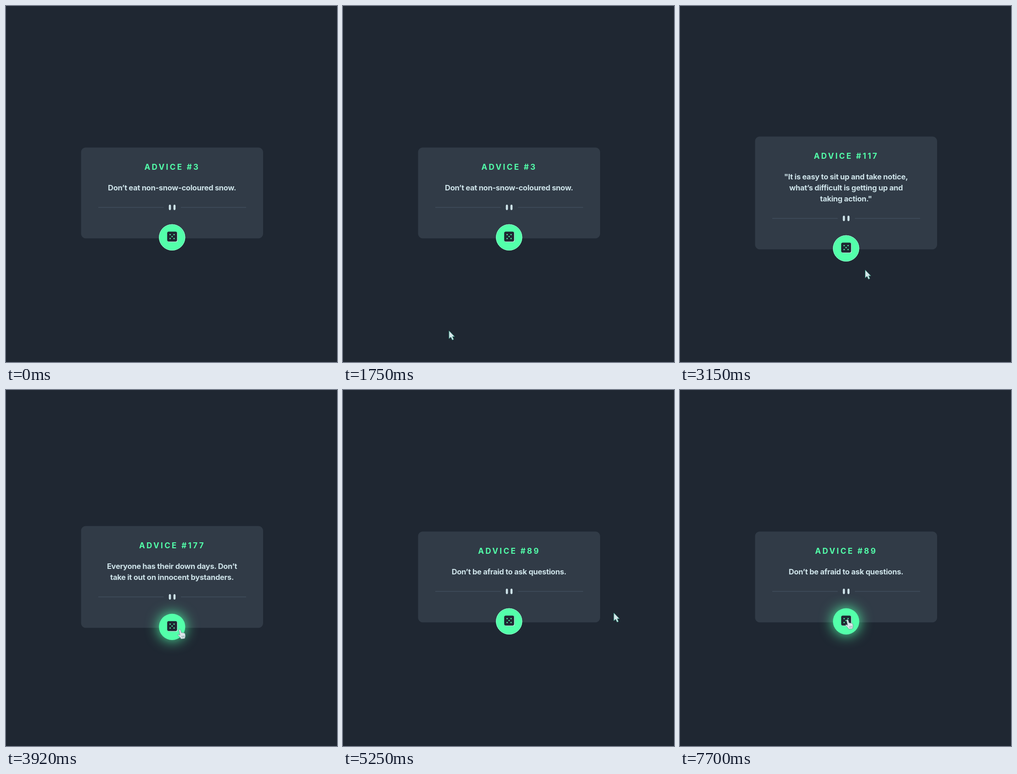
An HTML page for the animation above (8000 ms loop, 721x776 px).

```html
<!DOCTYPE html>
<html lang="en">
<head>
<meta charset="utf-8">
<title>Advice generator</title>
<style>
  html, body { margin: 0; width: 721px; height: 776px; overflow: hidden; background: #1f2732; }
  svg { display: block; }
  text { font-family: Inter, "Open Sans", sans-serif; text-anchor: middle; }
  #title { font-size: 17px; font-weight: 700; letter-spacing: 3.35px; fill: #53ffaa; }
  #quote { font-size: 16.5px; font-weight: 700; letter-spacing: -.3px; fill: #cee3e9; }
  #glow { filter: blur(15px); }
</style>
</head>
<body>
<svg width="721" height="776" viewBox="0 0 721 776">
  <rect id="card" x="163.5" width="396.5" rx="10" fill="#313b47"/>
  <text id="title" x="362"></text>
  <text id="quote"></text>
  <g id="divider">
    <path d="M201 0H343.5M381 0H523" stroke="#495766"/>
    <path d="M357 -3.600V3.600M367 -3.600V3.600" stroke="#cee3e9" stroke-width="4.600" stroke-linecap="round"/>
  </g>
  <g id="button">
    <circle id="glow" r="28.6" fill="#53ffaa"/>
    <circle r="28.6" fill="#53ffaa"/>
    <circle id="rim" r="28.1" fill="none" stroke="#8dffc8"/>
    <rect x="-9.900" y="-11.600" width="22" height="22" rx="3.800" fill="#b9f2dc"/>
    <rect x="-10.700" y="-12.500" width="21.600" height="21.600" rx="3.600" fill="#1f2732"/>
    <g id="pips" fill="#53ffaa"></g>
  </g>
  <path id="arrow" fill="#d7e6ea" stroke="#3c9c88" stroke-linejoin="round"
    d="M0 0V17L4 13.600L7 20L10 18.800L7.300 12.600H12Z"/>
  <g id="hand" fill="#dce6ea" stroke="#66858a" stroke-width=".8" stroke-linejoin="round" stroke-linecap="round">
    <path d="M-2 1C-1.600 -1 1 -.8 1.600 1L3.300 7Q5 5.800 6.200 7.300Q8 6.300 8.900 7.800Q10.800 7.200 11.200 9L12 13Q12 16 10.600 19.500L2.600 20.300Q1 16.500 -4.200 12.200Q-4.500 9.800 -1.800 10.800L0 12Z"/>
    <path d="M4.200 14L4.700 17M6.600 13.800L7 16.800M9 13.500L9.200 16.500" fill="none"/>
  </g>
</svg>
<script>
const LOOP = 8000, TICK = 70, MID = 407.5, FADE = 280;
const BUTTON = { x: 361.8, r: 28.6 };

const cards = [
  { at: 0, no: 3, lines: ["Don’t eat non-snow-coloured snow."] },
  { at: 2170, no: 117, lines: ["\"It is easy to sit up and take notice,", "what’s difficult is getting up and", "taking action.\""] },
  { at: 3220, no: 177, lines: ["Everyone has their down days. Don’t", "take it out on innocent bystanders."] },
  { at: 5040, no: 89, lines: ["Don’t be afraid to ask questions."] }
];

const linear = k => k;
const easeOut = k => 1 - (1 - k) ** 2.7;
const clamp = v => Math.min(1, Math.max(0, v));

const home = { x: 340, y: 780 };
const moves = [
  { from: 140, to: 700, x: 368, y: 749, ease: easeOut },
  { from: 955, to: 1750, x: 231, y: 708, ease: easeOut },
  { from: 2450, to: 3290, x: 438, y: 549, ease: linear },
  { from: 3560, to: 4340, x: 365, y: 516, ease: easeOut },
  { from: 4970, to: 5250, x: 590, y: 486, ease: easeOut },
  { from: 6160, to: 7280, x: 365, y: 501, ease: easeOut }
];
const hovers = [{ on: 3640, off: 4970 }, { on: 6790, off: LOOP }];

const $ = id => document.getElementById(id);
const place = (el, x, y) => el.setAttribute("transform", `translate(${x} ${y})`);

function pointerAt(t) {
  return moves.reduce((p, m) => {
    const k = m.ease(clamp((t - m.from) / (m.to - m.from)));
    return { x: p.x + (m.x - p.x) * k, y: p.y + (m.y - p.y) * k };
  }, home);
}

function glowAt(t) {
  return Math.max(...hovers.map(h => clamp((t - h.on) / FADE) * clamp(1 - (t - h.off) / FADE)));
}

function drawPips() {
  for (const x of [-1, 0, 1])
    for (const y of [-1, 0, 1])
      if (x * x === y * y)
        $("pips").innerHTML += `<circle cx="${4.3 * x}" cy="${4.3 * y - 1.7}" r="1.4"/>`;
}

let shown;
function showCard(card) {
  if (card === shown) return;
  shown = card;
  const height = 174 + 24 * card.lines.length;
  const top = MID - height / 2, bottom = MID + height / 2;
  $("card").setAttribute("y", top);
  $("card").setAttribute("height", height);
  $("title").textContent = "ADVICE #" + card.no;
  $("title").setAttribute("y", top + 48.8);
  $("quote").innerHTML = card.lines
    .map((line, i) => `<tspan x="361.6" y="${top + 93.5 + 24 * i}">${line}</tspan>`).join("");
  place($("divider"), 0, bottom - 67.5);
  BUTTON.y = bottom - 2.2;
  place($("button"), BUTTON.x, BUTTON.y);
}

function render(now) {
  const t = Math.floor((now % LOOP) / TICK) * TICK;
  showCard(cards.filter(c => c.at <= t).pop());

  const glow = glowAt(t);
  $("glow").style.opacity = glow;
  $("rim").style.opacity = 1 - glow;

  const { x, y } = pointerAt(t);
  const over = Math.hypot(x - BUTTON.x, y - BUTTON.y) < BUTTON.r;
  $("hand").style.display = over ? "" : "none";
  $("arrow").style.display = over ? "none" : "";
  place($(over ? "hand" : "arrow"), x, y);
}

drawPips();
const start = performance.now();
function frame() {
  render(performance.now() - start);
  requestAnimationFrame(frame);
}
frame();
</script>
</body>
</html>
```
